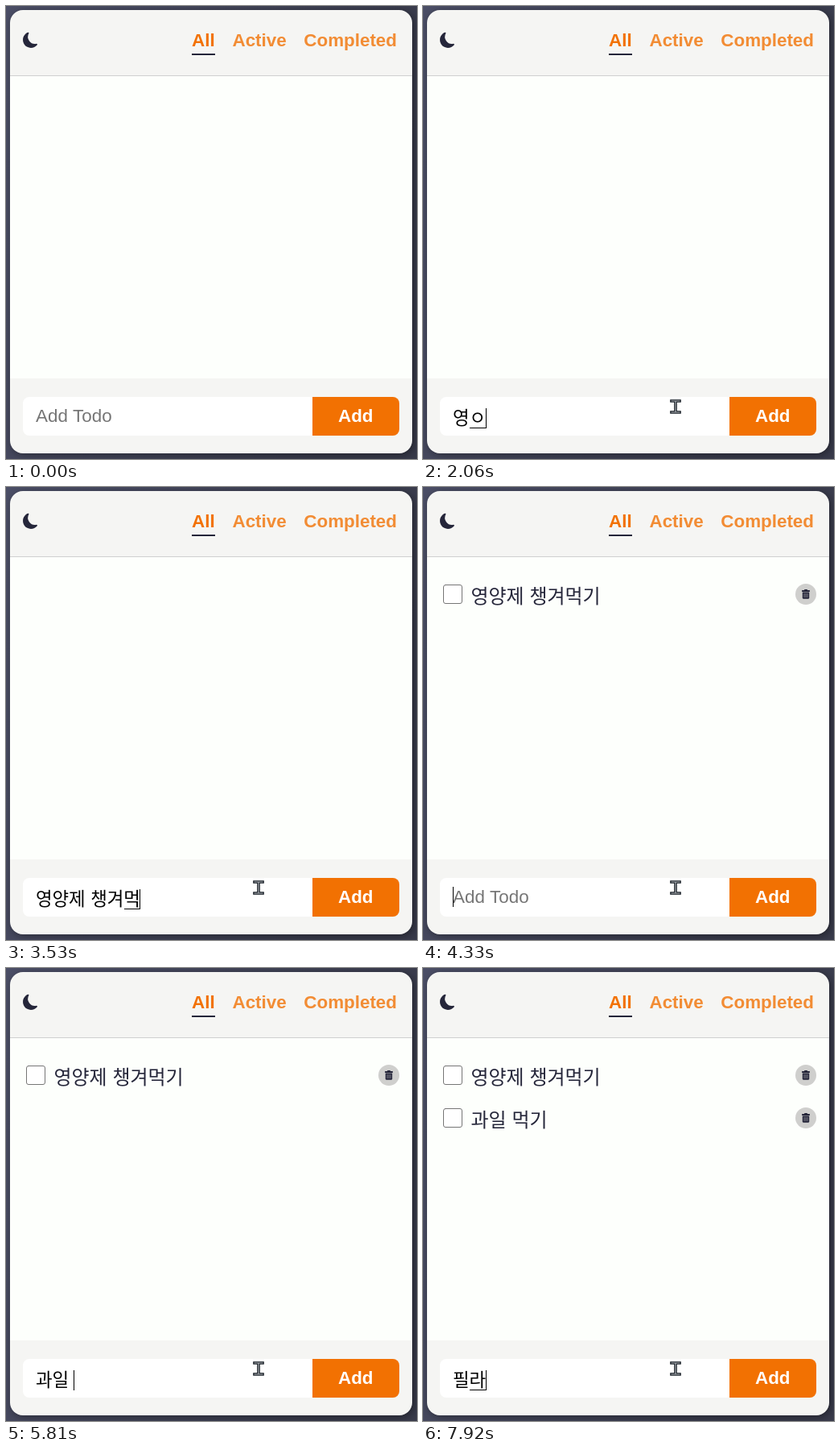
Write an HTML page with a canvas that moves like this. It is 511x562 px and loops after 8000 ms.

```html
<!DOCTYPE html>
<html lang="ko">
<head>
<meta charset="utf-8">
<title>Todo</title>
<style>
html, body { margin: 0; width: 511px; height: 562px; overflow: hidden; background: #3b3d4d; }
canvas { display: block; }
</style>
</head>
<body>
<canvas id="stage" width="511" height="562"></canvas>
<script>
const ctx = document.getElementById('stage').getContext('2d');
const LOOP = 8000;
const BLINK = 530;
const INK = '#25263a';
const ORANGE = '#f27102';
const LATIN = '"Liberation Sans", Arial, sans-serif';
const HANGUL = '"Noto Sans CJK KR", "Noto Sans KR", "Noto Sans CJK JP", sans-serif';

// Contents of the input after each keystroke; the last syllable is being composed.
const typing = [
  [540, ''], [1470, 'ㅇ'], [1800, '여'], [1870, '영'], [2060, '영ㅇ'], [2190, '영양'],
  [2460, '영양ㅈ'], [2590, '영양제'], [2730, '영양제 '], [2920, '영양제 ㅊ'], [3010, '영양제 챙'],
  [3200, '영양제 챙ㄱ'], [3270, '영양제 챙겨'], [3390, '영양제 챙겸'], [3530, '영양제 챙겨먹'],
  [3740, '영양제 챙겨먹ㄱ'], [3860, '영양제 챙겨먹기'], [4330, ''],
  [5260, 'ㄱ'], [5330, '고'], [5400, '과'], [5480, '광'], [5600, '과이'], [5670, '과일'],
  [5810, '과일 '], [5940, '과일 ㅁ'], [6070, '과일 먹'], [6270, '과일 먹ㄱ'], [6340, '과일 먹기'], [7130, ''],
  [7460, 'ㅍ'], [7590, '피'], [7660, '필'], [7850, '필ㄹ'], [7920, '필라']
];
const todos = [[4330, '영양제 챙겨먹기'], [7130, '과일 먹기']];
const pointer = [
  [130, 427, 546], [200, 372, 522], [270, 318, 500], [340, 295, 492],
  [540, 300, 488], [670, 295, 492], [940, 314, 497]
];

const moon = new Path2D('M6.08 1.14A7.28 7.28 0 0 0 14.05 11.71A.79 .79 0 0 1 14.83 12.92' +
  'A8.35 8.29 0 1 1 5.12 .06A.75 .75 0 0 1 6.08 1.14Z');
const arrow = new Path2D('M.5 .5V15.5L4 12.2L6.5 17.8L8.8 16.8L6.3 11.3H11.2Z');

const latest = (list, t) => list.filter(entry => entry[0] <= t).pop();

function rect(x, y, w, h, color) {
  ctx.fillStyle = color;
  ctx.fillRect(x, y, w, h);
}

function rounded(x, y, w, h, radii, color) {
  ctx.beginPath();
  ctx.roundRect(x, y, w, h, radii);
  ctx.fillStyle = color;
  ctx.fill();
}

function label(text, x, y, color, weight = 'bold') {
  ctx.font = `${weight} 22.4px ${LATIN}`;
  ctx.fillStyle = color;
  ctx.fillText(text, x, y);
}

const advance = (ch, size) => size * (ch === ' ' ? 0.2946 : 0.9174);
const measure = (text, size) => [...text].reduce((sum, ch) => sum + advance(ch, size), 0);

function hangul(text, x, y, size, color) {
  ctx.font = `${size}px ${HANGUL}`;
  ctx.fillStyle = color;
  for (const ch of text) {
    ctx.fillText(ch, x, y);
    x += advance(ch, size);
  }
}

function drawFrame() {
  const backdrop = ctx.createLinearGradient(0, 0, 511, 160);
  backdrop.addColorStop(0, '#4b4e66');
  backdrop.addColorStop(1, '#383a4a');
  rect(0, 0, 511, 562, backdrop);

  ctx.save();
  ctx.shadowColor = 'rgba(0,0,0,.4)';
  ctx.shadowBlur = 10;
  ctx.shadowOffsetX = 2;
  ctx.shadowOffsetY = 2;
  rounded(5, 5, 500, 550, 16, '#f5f5f3');
  ctx.restore();

  rect(5, 86, 500, 1, '#d0d0d0');
  rect(5, 87, 500, 375, '#fdfffc');

  ctx.save();
  ctx.translate(21, 32.7);
  ctx.scale(1.2, 1.2);
  ctx.fillStyle = INK;
  ctx.fill(moon);
  ctx.restore();

  label('All', 231, 50, ORANGE);
  label('Active', 281.5, 50, '#f28c34');
  label('Completed', 370.3, 50, '#f28c34');
  rect(231, 59, 29, 2, INK);

  rounded(21, 485, 360, 48, [8, 0, 0, 8], '#fff');
  rounded(381, 485, 108, 48, [0, 8, 8, 0], ORANGE);
  label('Add', 413, 516, '#fff');
}

function drawTrash(cx, cy) {
  ctx.beginPath();
  ctx.arc(cx, cy, 13, 0, Math.PI * 2);
  ctx.fillStyle = '#cfcfcd';
  ctx.fill();
  rounded(cx - 2, cy - 6, 4, 2, 0.7, INK);
  rounded(cx - 5, cy - 5, 10, 2, 0.7, INK);
  rounded(cx - 4.2, cy - 2.4, 8.4, 8.2, [0, 0, 1.5, 1.5], INK);
  for (const dx of [-2, 0, 2]) rect(cx + dx - 0.3, cy - 1, 0.6, 5, '#b5b5b8');
}

function drawTodo(text, row) {
  const y = 121 + row * 53;
  ctx.beginPath();
  ctx.roundRect(25.5, y + 0.5, 23, 23, 2.5);
  ctx.fillStyle = '#fff';
  ctx.fill();
  ctx.lineWidth = 1;
  ctx.strokeStyle = '#767676';
  ctx.stroke();
  hangul(text, 59.4, y + 22.5, 24, INK);
  drawTrash(476, y + 12);
}

function drawInput(t) {
  const [since, text] = latest(typing, t) || [Infinity, ''];
  const size = 22.4;
  if (text) hangul(text, 37, 519, size, '#000');
  else label('Add Todo', 37, 516, '#757575', 'normal');

  const end = Math.floor(37 + measure(text, size));
  if (text && !text.endsWith(' ')) {
    const start = Math.ceil(37 + measure(text.slice(0, -1), size) + 0.1);
    rect(start, 523, end - start, 1, '#000');
  }
  if (t >= since && Math.floor((t - since) / BLINK) % 2 === 0) {
    rect(end, text ? 499 : 496, 1, 25, '#000');
  }
}

function drawBeam(x, y) {
  ctx.beginPath();
  ctx.moveTo(x - 5, y - 7);
  ctx.lineTo(x + 5, y - 7);
  ctx.moveTo(x, y - 7);
  ctx.lineTo(x, y + 7);
  ctx.moveTo(x - 5, y + 7);
  ctx.lineTo(x + 5, y + 7);
  for (const [width, color] of [[3.6, '#111820'], [1.1, '#b9bcc0']]) {
    ctx.lineWidth = width;
    ctx.lineCap = 'square';
    ctx.strokeStyle = color;
    ctx.stroke();
  }
}

function drawArrow(x, y) {
  ctx.save();
  ctx.translate(x, y);
  ctx.fillStyle = '#fff';
  ctx.fill(arrow);
  ctx.lineWidth = 1;
  ctx.strokeStyle = '#000';
  ctx.stroke(arrow);
  ctx.restore();
}

function drawPointer(t) {
  const spot = latest(pointer, t);
  if (!spot) return;
  const [, x, y] = spot;
  const overInput = x < 381 && y < 533;
  (overInput ? drawBeam : drawArrow)(x, y);
}

function render(now) {
  const t = now % LOOP;
  drawFrame();
  todos.forEach(([time, text], row) => t >= time && drawTodo(text, row));
  drawInput(t);
  drawPointer(t);
}

const started = performance.now();
function tick() {
  render(performance.now() - started);
  requestAnimationFrame(tick);
}
tick();
</script>
</body>
</html>
```
